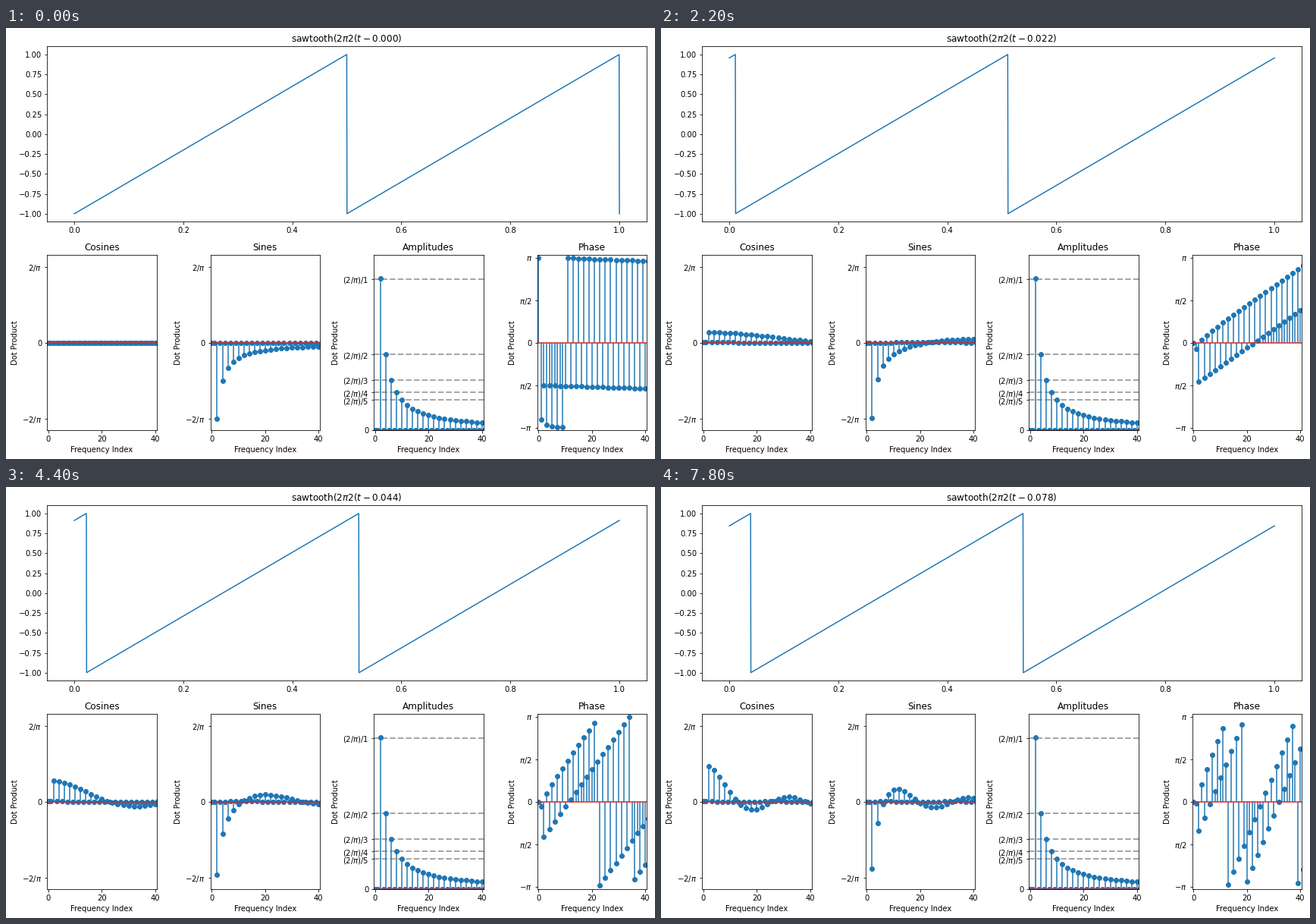
A matplotlib script for the animation above (8 s loop, 856 by 568 pixels).

```python
import numpy as np
import matplotlib.pyplot as plt
from matplotlib.animation import FuncAnimation

W, H, DPI = 856, 568, 72
FRAMES, INTERVAL = 40, 200
N = 2000          # samples of the signal
CYCLES = 2
PEAK = 2 / np.pi

t = np.linspace(0, 1, N)
shifts = np.linspace(0, 1, 500)
freqs = np.arange(60)
angles = 2 * np.pi * np.outer(freqs, np.arange(N)) / N
cos_basis, sin_basis = np.cos(angles), np.sin(angles)


def sawtooth(shift):
    return 2 * np.mod(CYCLES * t - shift, 1) - 1


def analyse(x):
    """Cosine and sine dot products, amplitude and phase."""
    c = cos_basis @ x * 2 / N + 0.0
    s = sin_basis @ x * 2 / N + 0.0
    return c, s, np.hypot(c, s), np.arctan2(s, c)


fig = plt.figure(figsize=(W / DPI, H / DPI), dpi=DPI, facecolor="white")


def panel(left, top, width, height):
    return fig.add_axes([left / W, 1 - (top + height) / H, width / W, height / H])


def spectrum(col, title, ylim, ticks, labels):
    ax = panel(54.2 + 215.5 * col, 299.2, 144.3, 231)
    ax.set_title(title)
    ax.set_xlabel("Frequency Index")
    ax.set_ylabel("Dot Product")
    ax.set_yticks(ticks, labels)
    if title == "Amplitudes":
        for y in ticks[1:]:
            ax.axhline(y, color="#a6a6a6", ls="--", lw=2)
    stem = ax.stem(freqs, np.zeros(len(freqs)))
    ax.set_xticks([0, 20, 40])
    ax.set_xlim(-0.5, 40.5)
    ax.set_ylim(*ylim)
    return stem


wave_ax = panel(54.2, 24.3, 790.8, 231)
wave, = wave_ax.plot(t, sawtooth(0))
wave_ax.set_xlim(-0.05, 1.05)
wave_ax.set_ylim(-1.1, 1.1)
title = wave_ax.set_title("")

top = PEAK + 0.1
turn = np.pi + 0.1
dot_ticks = [-PEAK, 0, PEAK]
dot_labels = [r"$-2/\pi$", "0", r"$2/\pi$"]
ks = range(1, 6)

stems = [
    spectrum(0, "Cosines", (-top, top), dot_ticks, dot_labels),
    spectrum(1, "Sines", (-top, top), dot_ticks, dot_labels),
    spectrum(2, "Amplitudes", (0, top),
             [0] + [PEAK / k for k in ks],
             ["0"] + [rf"$(2/\pi)/{k}$" for k in ks]),
    spectrum(3, "Phase", (-turn, turn),
             np.pi * np.array([-1, -0.5, 0, 0.5, 1]),
             [r"$-\pi$", r"$\pi/2$", "0", r"$\pi/2$", r"$\pi$"]),
]


def update(i):
    shift = shifts[i]
    x = sawtooth(shift)
    wave.set_ydata(x)
    title.set_text(rf"sawtooth($2\pi {CYCLES}(t-{shift:.3f})$")
    for stem, values in zip(stems, analyse(x)):
        stem.markerline.set_ydata(values)
        stem.stemlines.set_segments([[(n, 0), (n, v)] for n, v in zip(freqs, values)])
    return []


anim = FuncAnimation(fig, update, frames=FRAMES, interval=INTERVAL,
                     repeat=True, repeat_delay=0)
plt.show()
```
